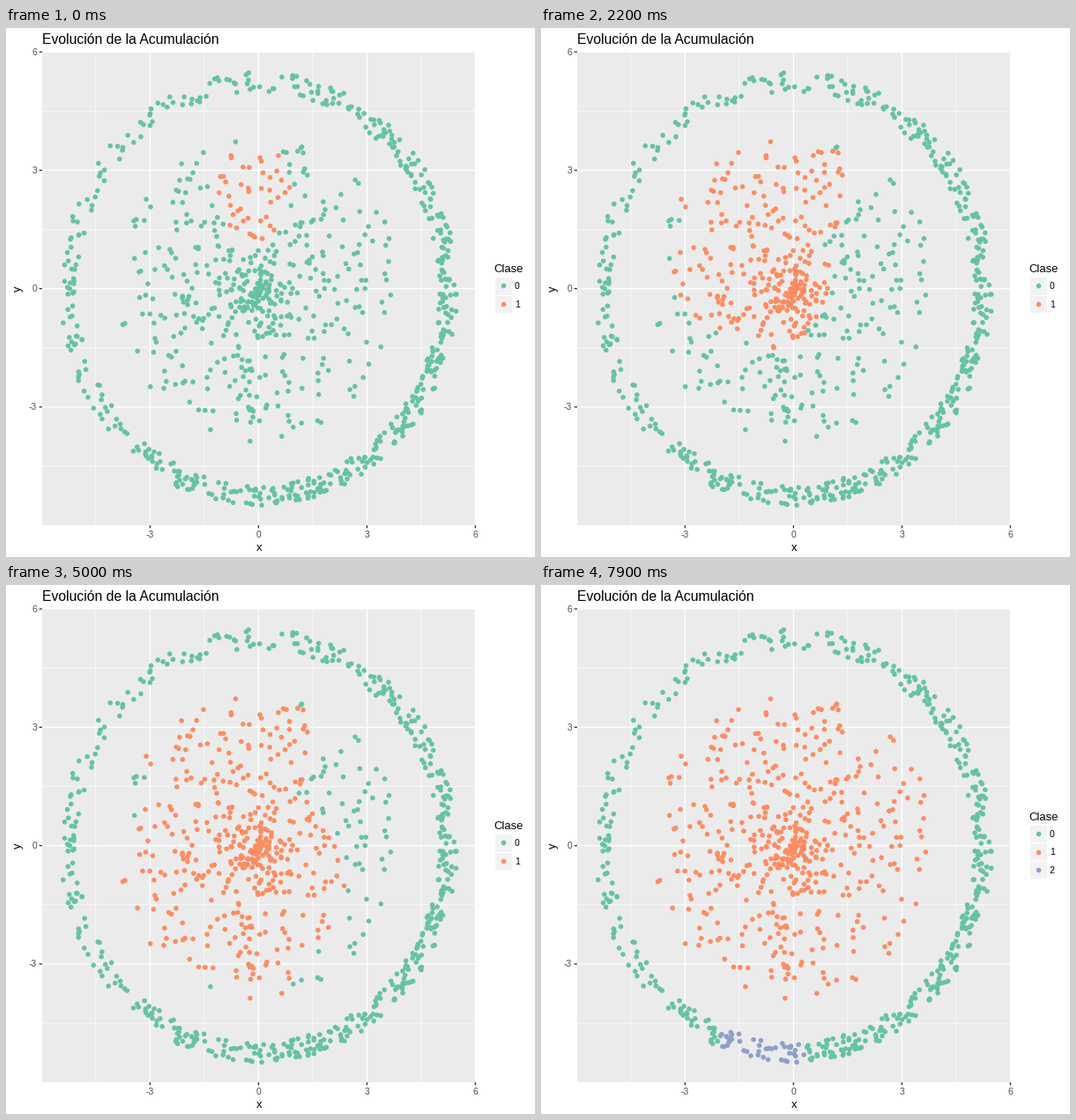
Write a matplotlib script that moves like this. It is 600x600 px and loops after 8000 ms.

```python
import numpy as np
import matplotlib.pyplot as plt
from matplotlib.animation import FuncAnimation
from matplotlib.patches import Rectangle

STEPS = 80
WAVE = 9               # steps each wave of growth takes
SECOND = 77            # step at which class 2 is born
X0, Y0, SX, SY = 286.4, 295.6, 41, 44.75
PALETTE = np.array(["#66C2A5", "#FC8D62", "#8DA0CB"])
DOT = (5.6 * 0.72) ** 2

# ellipses claimed one after another: centre x, y and radii
WAVES = [(281, 185, 41, 56), (255, 185, 105, 70), (235, 281, 86, 66),
         (292, 311, 78, 65), (286, 354, 68, 120), (258, 336, 126, 86),
         (258, 330, 150, 110), (392, 353, 58, 101), (282, 292, 156, 124)]

plt.rcParams["font.family"] = "Liberation Sans"
rng = np.random.default_rng(12)


def polar(r, a):
    return np.column_stack([X0 + SX * r * np.cos(a), Y0 - SY * r * np.sin(a)])


def make_ring(n):
    """Ring that is densest at the lower right."""
    a = rng.uniform(0, 2 * np.pi, 2 * n)
    keep = rng.random(a.size) < 0.75 + 0.25 * np.cos(a + np.radians(50))
    a = a[keep][:n]
    return polar(rng.uniform(5, 5.5, a.size), a)


def make_disc(n):
    return polar(rng.uniform(0, 3.92, n), rng.uniform(0, 2 * np.pi, n))


def disc_steps(p):
    """Each wave spreads outwards from the centre of the one before."""
    step = np.full(len(p), -1)
    step[:] = SECOND - 1 - rng.integers(0, 4, len(p))
    free = np.ones(len(p), bool)
    prev = None
    for k, (cx, cy, rx, ry) in enumerate(WAVES):
        inside = ((p[:, 0] - cx) / rx) ** 2 + ((p[:, 1] - cy) / ry) ** 2 < 1
        idx = np.flatnonzero(inside & free)
        if prev is None:
            step[idx] = 0
        else:
            far = np.hypot(*(p[idx] - prev).T)
            rank = far.argsort().argsort()
            step[idx] = 1 + WAVE * (k - 1) + WAVE * rank // max(len(idx), 1)
        free[idx] = False
        prev = (cx, cy)
    return step


def ring_steps(p):
    side = np.abs(p[:, 0] - 253)
    return np.where((p[:, 1] > 490) & (side < 48), SECOND + side // 16, STEPS)


def write(x, y, s, px, color="black", **kw):
    kw.setdefault("va", "baseline")
    return ax.text(x, y, s, fontsize=px * 0.72, color=color, **kw)


def line(xs, ys, color, width, z):
    ax.plot(xs, ys, color=color, lw=width * 0.72, zorder=z,
            solid_capstyle="butt", snap=False)


fig = plt.figure(figsize=(6, 6), dpi=100, facecolor="white")
ax = fig.add_axes([0, 0, 1, 1])
ax.set_xlim(0, 600)
ax.set_ylim(600, 0)
ax.axis("off")

L, R, T, B = 41, 533, 27, 564
ax.add_patch(Rectangle((L, T), R - L, B - T, fc="#EBEBEB", lw=0, zorder=0))
for v in (-4.5, -1.5, 1.5, 4.5):
    line([X0 + SX * v] * 2, [T, B], "white", 0.65, 1)
    line([L, R], [Y0 - SY * v] * 2, "white", 0.65, 1)
for v in (-3, 0, 3, 6):
    gx, gy = X0 + SX * v, Y0 - SY * v
    line([gx] * 2, [T, B], "white", 1.3, 2)
    line([L, R], [gy] * 2, "white", 1.3, 2)
    line([gx] * 2, [B, B + 3.3], "#333333", 1.3, 2)
    line([L - 3.3, L], [gy] * 2, "#333333", 1.3, 2)
    write(gx, 577.5, str(v), 10.4, "#4D4D4D", ha="center")
    write(35.2, gy + 3.6, str(v), 10.4, "#4D4D4D", ha="right")

write(41, 18, "Evolución de la Acumulación", 15.7)
write(287, 593, "x", 13, ha="center")
write(14, Y0, "y", 13, ha="center", va="center", rotation=90)

ring, disc = make_ring(510), make_disc(490)
step = np.concatenate([ring_steps(ring), disc_steps(disc)])
label = np.repeat([2, 1], [len(ring), len(disc)])
dots = ax.scatter(*np.vstack([ring, disc]).T, s=DOT, lw=0, zorder=3)

KEY = 20.5
head = write(553.5, 277, "Clase", 13)
keys = []
for i, c in enumerate(PALETTE):
    box = Rectangle((553.5, 0), KEY, KEY, fc="#F2F2F2", ec="white", lw=0.8)
    ax.add_patch(box)
    dot = ax.scatter([564], [0], s=DOT, lw=0, color=c, zorder=3)
    keys.append((box, dot, write(576.8, 0, str(i), 10.4)))


def draw(n):
    dots.set_facecolor(PALETTE[np.where(n >= step, label, 0)])
    count = 3 if n >= SECOND else 2
    top = 302.7 - KEY * count / 2
    head.set_y(top - 5)
    for i, (box, dot, text) in enumerate(keys):
        y = top + KEY * i
        box.set_y(y)
        dot.set_offsets([(564.2, y + KEY / 2)])
        text.set_y(y + KEY / 2 + 3.8)
        for item in (box, dot, text):
            item.set_visible(i < count)
    return []


anim = FuncAnimation(fig, draw, frames=STEPS, interval=100, repeat=True,
                     repeat_delay=0, blit=False)
plt.show()
```
